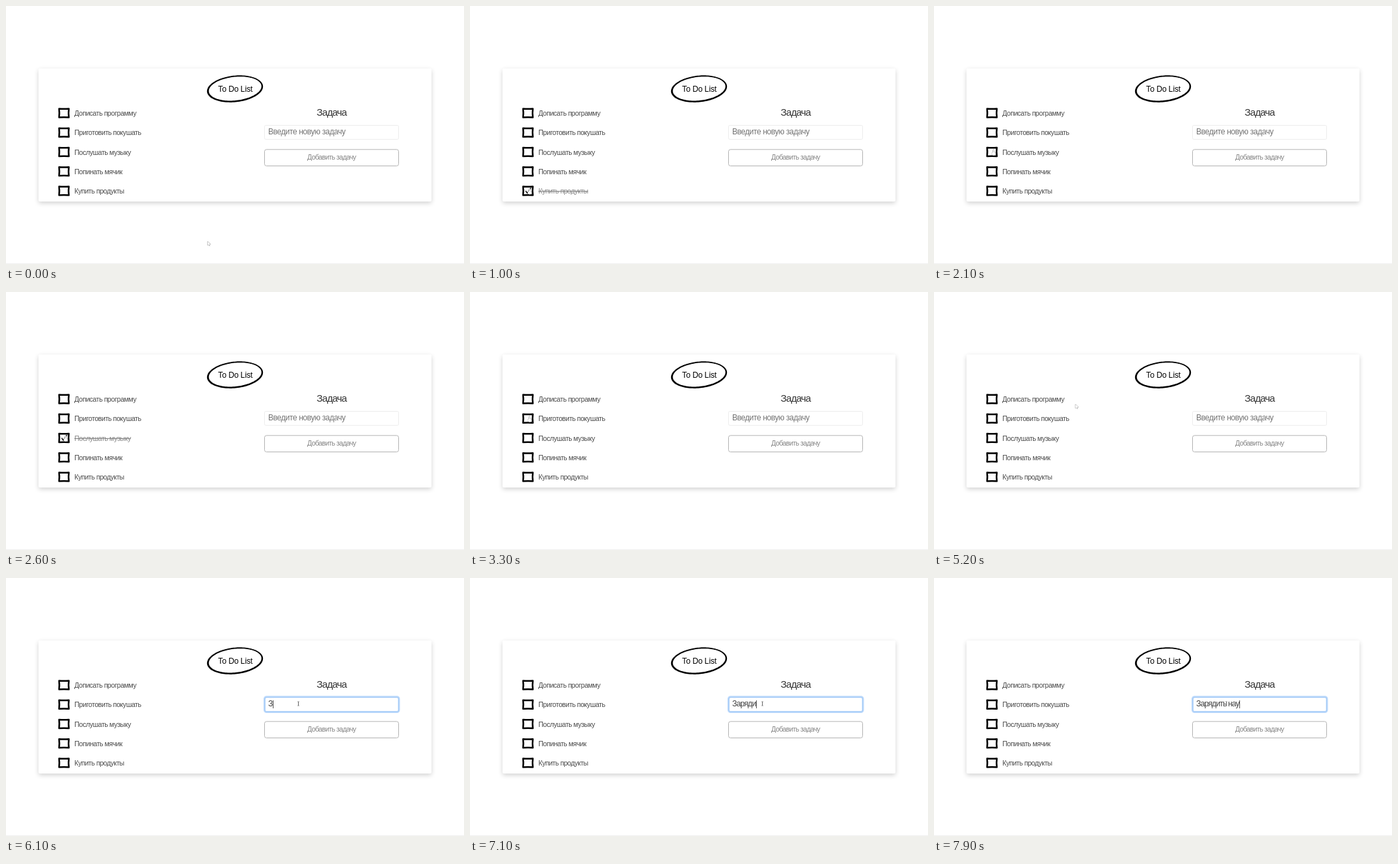
Write an HTML page with a canvas that moves like this. It is 690 px wide and 388 px high and loops after 8000 ms.

```html
<!DOCTYPE html>
<html lang="ru">
<head>
<meta charset="utf-8">
<title>To Do List</title>
<style>
html, body { margin: 0; width: 100%; height: 100%; overflow: hidden; background: #fff; }
canvas { display: block; width: 690px; height: 388px; }
</style>
</head>
<body>
<canvas id="stage" width="690" height="388"></canvas>
<script>
const ctx = document.getElementById('stage').getContext('2d');
const LOOP = 8000;
const STEP = 100;
const CHECK_HOLD = 340;
const FOCUS = 5500;
const TYPING = 6000;

const labels = [
  'Дописать программу', 'Приготовить покушать', 'Послушать музыку',
  'Попинать мячик', 'Купить продукты'
];
const typed = 'Зарядить нау';

// The list is ticked from the bottom up, a little slower each time.
const tasks = labels.map((label, i) => {
  const turn = labels.length - 1 - i;
  const on = 900 + 700 * turn + 60 * turn * turn;
  return { label, y: 161 + 29.25 * i, on, off: on + CHECK_HOLD };
});

// Places the pointer visits, with the time of leaving and of the trip there.
const visits = [
  { x: 304, y: 354, leave: 0 },
  ...tasks.map(({ y, off }) => ({ x: 90, y: y - 3, leave: off, trip: STEP })).reverse(),
  { x: 440, y: 189, leave: LOOP, trip: 500 }
];
visits[1].trip = 700;

const ease = u => u * u * (3 - 2 * u);
const keyTime = i => TYPING + 230 * i - 5.4 * i * i;

function text(str, x, y, size, spacing, color, center) {
  ctx.font = `${size}px "Liberation Sans", Arial, sans-serif`;
  ctx.letterSpacing = spacing + 'px';
  ctx.fillStyle = color;
  const width = ctx.measureText(str).width;
  ctx.fillText(str, center ? x - width / 2 : x, y);
  return width;
}

function box(x, y, w, h, r, color, lineWidth = 1) {
  ctx.beginPath();
  ctx.roundRect(x, y, w, h, r);
  ctx.strokeStyle = color;
  ctx.lineWidth = lineWidth;
  ctx.stroke();
}

function polyline(points, color, lineWidth) {
  ctx.beginPath();
  points.forEach(([x, y]) => ctx.lineTo(x, y));
  ctx.strokeStyle = color;
  ctx.lineWidth = lineWidth;
  ctx.stroke();
}

function drawCard() {
  ctx.fillStyle = '#fff';
  ctx.fillRect(0, 0, 690, 388);
  ctx.fillStyle = '#f0f0f0';
  ctx.fillRect(0, 387, 690, 1);
  ctx.save();
  ctx.shadowColor = 'rgba(0,0,0,.18)';
  ctx.shadowBlur = 7;
  ctx.shadowOffsetY = 2.5;
  ctx.fillStyle = '#fff';
  ctx.beginPath();
  ctx.roundRect(49, 94, 592, 200, 2);
  ctx.fill();
  ctx.restore();
}

// Slanted ellipse, drawn twice with shifted centres for an uneven pen line.
function addOval(cx, cy, rx, ry) {
  for (let a = 0; a < Math.PI * 2; a += 0.05) {
    const x = cx + rx * Math.cos(a);
    const y = cy + ry * Math.sin(a) - 3.5 * Math.cos(a);
    if (a) ctx.lineTo(x, y);
    else ctx.moveTo(x, y);
  }
  ctx.closePath();
}

function drawBadge() {
  ctx.beginPath();
  addOval(345, 124.6, 42.2, 20);
  addOval(345.2, 124.3, 39.6, 17.8);
  ctx.fillStyle = '#000';
  ctx.fill('evenodd');
  text('To Do List', 345.5, 129, 12, -0.15, '#000', true);
}

// Square whose sides bend slightly inwards.
function drawCheckbox() {
  const corner = k => {
    const a = Math.PI / 4 + k * Math.PI / 2;
    return [10.4 * Math.cos(a), 9.3 * Math.sin(a)];
  };
  ctx.beginPath();
  ctx.moveTo(...corner(0));
  for (let k = 0; k < 4; k++) {
    const [x0, y0] = corner(k);
    const [x1, y1] = corner(k + 1);
    ctx.quadraticCurveTo(0.44 * (x0 + x1), 0.44 * (y0 + y1), x1, y1);
  }
  ctx.closePath();
  ctx.lineJoin = 'round';
  ctx.strokeStyle = '#000';
  ctx.lineWidth = 2.5;
  ctx.stroke();
}

function drawTask({ label, y, on, off }, t) {
  const done = t >= on && t < off;
  ctx.save();
  ctx.translate(87.3, y);
  drawCheckbox();
  if (done) polyline([[-3.5, 0], [-1, 3.5], [4.5, -4.5]], '#111', 1.4);
  ctx.restore();

  const width = text(label, 103, y + 4, 10.5, -0.45, done ? '#8a8a8a' : '#4a4a4a');
  if (done) polyline([[103, y + 0.8], [103 + width, y + 0.8]], '#777', 1);
}

function drawForm(t) {
  text('Задача', 490.5, 165, 15, -0.9, '#333', true);

  if (t >= FOCUS) {
    box(389.5, 178.8, 202.5, 22.8, 3, '#bcd9fb', 3);
    box(390, 179.5, 201.5, 21.5, 2, '#9cc6f5', 0.8);
  } else {
    box(389.5, 179.5, 202, 21, 2, '#ededed');
  }

  const count = [...typed].filter((_, i) => t >= keyTime(i)).length;
  let caretX = 395.5;
  if (count) caretX += text(typed.slice(0, count), 395, 193, 12, -0.85, '#444');
  else text('Введите новую задачу', 395, 193, 12, -0.45, '#757575');
  if (t > FOCUS) {
    ctx.fillStyle = '#555';
    ctx.fillRect(Math.round(caretX), 184, 1, 12);
  }

  box(389.5, 215.8, 202, 24.7, 3, '#b4b4b4');
  text('Добавить задачу', 490.5, 231, 10.5, -0.6, '#858585', true);
}

function pointerAt(t) {
  const i = visits.findIndex(v => t < v.leave);
  const from = visits[i - 1];
  const to = visits[i];
  const u = ease(Math.min(1, (t - from.leave) / to.trip));
  return [from.x + (to.x - from.x) * u, from.y + (to.y - from.y) * u];
}

function drawHand() {
  ctx.beginPath();
  ctx.ellipse(0, 5.6, 2.8, 2.6, 0, 0, Math.PI * 2);
  ctx.roundRect(-1.2, -0.5, 1.6, 5, 0.8);
  ctx.strokeStyle = '#777';
  ctx.lineWidth = 0.8;
  ctx.stroke();
  ctx.fill();
}

function drawArrow() {
  polyline([[0, 0], [0, 6], [1.4, 4.8], [2.8, 6.6], [2.4, 4.4], [4.2, 4.2], [0, 0]], '#777', 0.8);
  ctx.fill();
}

function drawTextCursor() {
  polyline([[0.5, -3], [0.5, 3]], '#666', 1);
  for (const y of [-3, 3]) polyline([[-1, y], [2, y]], '#888', 0.8);
}

function drawPointer(t) {
  const [x, y] = pointerAt(t);
  const overBox = x > 79 && x < 97 && tasks.some(task => Math.abs(task.y - y) < 8);
  const overInput = x > 389 && y > 179 && y < 201;
  ctx.save();
  ctx.translate(x, y);
  ctx.fillStyle = '#fff';
  if (overInput) drawTextCursor();
  else if (overBox) drawHand();
  else drawArrow();
  ctx.restore();
}

function draw(now) {
  const t = Math.floor((now % LOOP) / STEP) * STEP;
  drawCard();
  drawBadge();
  tasks.forEach(task => drawTask(task, t));
  drawForm(t);
  drawPointer(t);
  requestAnimationFrame(draw);
}

requestAnimationFrame(draw);
</script>
</body>
</html>
```
